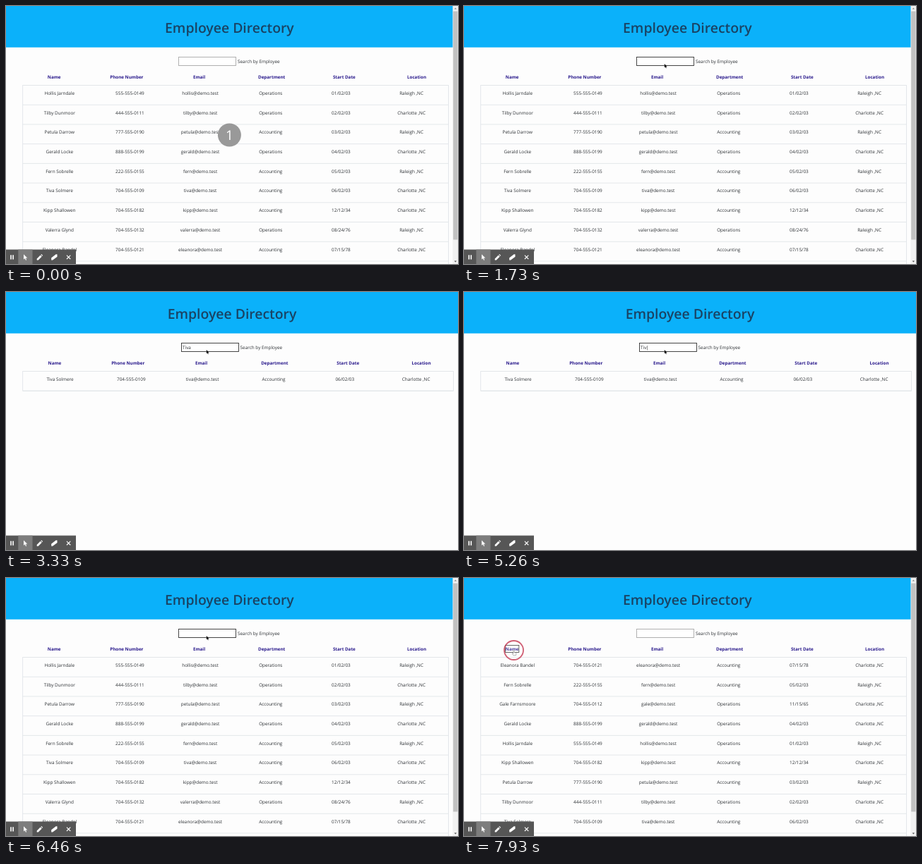
Write an HTML page that moves like this. It is 640 by 366 pixels and loops after 8000 ms.

```html
<!DOCTYPE html>
<html lang="en">
<head>
<meta charset="utf-8">
<title>Employee Directory</title>
<style>
html, body { margin: 0; width: 100%; height: 100%; overflow: hidden; background: #fdfdfd; }
svg { display: block; width: 640px; height: 366px; }
text { font: 6.4px "Open Sans", "Noto Sans", sans-serif; fill: #2b2f33; text-rendering: geometricPrecision; }
.mid text, text.mid { text-anchor: middle; }
.title { font-size: 19.4px; font-weight: 600; fill: #1a4364; }
.head text { font-size: 6.25px; font-weight: 700; fill: #2a1a8c; }
.count { font-size: 19px; fill: #fff; }
.line { fill: none; stroke: #dee2e6; stroke-width: .8; }
</style>
</head>
<body>
<svg viewBox="0 0 640 366">
  <rect width="640" height="366" fill="#fdfdfd"/>
  <g id="page"></g>
  <g id="scrollbar">
    <rect x="632.5" width="7.5" height="366" fill="#f1f1f1"/>
    <rect x="633.2" y="7.5" width="6.2" height="324" fill="#c1c1c1"/>
    <path d="M634.6 4.6 636.4 2.6 638.2 4.6Z" fill="#8a8a8a"/>
    <path d="M634.6 361.4 636.4 363.4 638.2 361.4Z" fill="#505050"/>
  </g>
  <g id="toolbar">
    <rect y="345.5" width="99" height="20.5" fill="#565656"/>
    <rect x="17.3" y="345.5" width="20.2" height="20.5" fill="#7d7d7d"/>
    <g fill="#fff">
      <path d="M6.2 353.2h1.6v6.4h-1.6zM9.3 353.2h1.6v6.4h-1.6z"/>
      <path d="M25 352.2v7.4l1.8-1.6 1.2 2.7 1.1-.5-1.2-2.6 2.4-.2z"/>
      <path d="M43.7 360.4v-2l5-5 2 2-5 5zM49.3 352.8l.9-.8 2 2-.9.8z"/>
      <path d="M64.2 357.2 70.6 352.2h1.9v3.6L66 360.6h-1.8z"/>
    </g>
    <path d="M85.9 353.6 91.3 359M91.3 353.6 85.9 359" stroke="#fff" stroke-width="1.1"/>
  </g>
  <g id="pointer">
    <path id="arrow" d="M0 0v5.3l1.2-1.1.9 2 .9-.4-.9-1.9h1.7z" fill="#000" stroke="#fff" stroke-width=".4" paint-order="stroke"/>
    <path id="hand" d="M-.6 .6a.6 .6 0 0 1 1.2 0V3l2.3.5q.7.2.6 1L3 7.3H-.6L-2.6 4.6q.5-.8 1.2-.2l.8.6z" fill="#fff" stroke="#555" stroke-width=".5"/>
  </g>
  <circle id="ring" fill="#fff" fill-opacity=".2" stroke="#c63a54" stroke-width="1.8"/>
  <g id="countdown">
    <circle cx="316.4" cy="183" r="16.5" fill="#999"/>
    <text class="count mid" x="316.4" y="189.8">1</text>
  </g>
</svg>
<script>
const LOOP = 8000, BLINK = 530, FOCUS = 1000, SORT = 7660;
const HEADS = ['Name', 'Phone Number', 'Email', 'Department', 'Start Date', 'Location'];
const STAFF = `Hollis Jarndale|555-555-0149|hollis|O|01/02/03|R
Tilby Dunmoor|444-555-0111|tilby|O|02/02/03|C
Petula Darrow|777-555-0190|petula|A|03/02/03|R
Gerald Locke|888-555-0199|gerald|O|04/02/03|C
Fern Sobrelle|222-555-0155|fern|A|05/02/03|R
Tiva Solmere|704-555-0109|tiva|A|06/02/03|C
Kipp Shallowen|704-555-0182|kipp|A|12/12/34|C
Valerra Glynd|704-555-0132|valerra|O|08/24/76|R
Eleanora Bandel|704-555-0121|eleanora|A|07/15/78|C
Gale Farnsmoore|704-555-0112|gale|O|11/15/65|C`.split('\n').map(line => {
  const [name, phone, user, dept, date, city] = line.split('|');
  return [name, phone, user + '@demo.test', dept === 'O' ? 'Operations' : 'Accounting',
    date, (city === 'R' ? 'Raleigh' : 'Charlotte') + ' ,NC'];
});
const SORTED = [...STAFF].sort((a, b) => a[0] < b[0] ? -1 : 1);

const TYPED = [[0, ''], [1860, 'T'], [2060, 'Ti'], [2400, 'Tiv'], [2660, 'Tiva'],
  [5200, 'Tiv'], [5500, 'Ti'], [5730, 'T'], [5870, '']];
const PATH = [[0, 308, 180], [200, 308, 180], [330, 292, 100], [530, 290, 97], [660, 283.8, 82],
  [6800, 283.8, 82], [7150, 170, 97], [7450, 76, 106], [7600, 70.5, 102.5]];
const CLICKS = [950, 7610];

const $ = id => document.getElementById(id);
const last = (list, t) => list.findLast(step => step[0] <= t);
const show = (el, on) => el.setAttribute('visibility', on ? 'visible' : 'hidden');
const text = (x, y, s, cls = '') => `<text x="${x}" y="${y}" class="${cls}">${s}</text>`;
const box = (x, y, w, h, attrs) => `<rect x="${x}" y="${y}" width="${w}" height="${h}" ${attrs}/>`;

function drawPage(query, sorted, focus, caret) {
  const full = !query;
  const width = full ? 633 : 640;
  const rows = (sorted ? SORTED : STAFF).filter(row => row[0].startsWith(query)).slice(0, 9);
  const mid = full ? 316.4 : 320;
  const left = full ? 244.5 : 248.5;
  const right = full ? 626.5 : 633.5;
  const [head0, headStep, cell0, cellStep] = full ? [68.2, 102.66, 75.8, 99.65] : [68.9, 103.82, 76.5, 100.82];
  const lineY = i => 112.5 + 27.72 * i;

  let out = box(0, 0, width, 58.7, 'fill="#0bb1fa"') + text(mid, 37.6, 'Employee Directory', 'title mid');
  out += box(left, 72.5, 81, 12, `fill="#fff" stroke="${focus ? '#333' : '#a8a8a8'}" stroke-width=".9"`);
  out += `<text x="${left + 1.5}" y="81.4">${query}<tspan fill="#000" dx="-.6" fill-opacity="${caret ? 1 : 0}">|</tspan></text>`;
  out += text(mid + 11.6, 81.4, 'Search by Employee');
  out += '<g class="mid head">' + HEADS.map((s, c) => text(head0 + headStep * c, 103, s)).join('') + '</g>';
  if (sorted) out += box(58.5, 95.5, 19.3, 10, 'fill="none" stroke="#222" stroke-width=".8"');

  const bottom = full ? 370 : lineY(rows.length);
  out += box(23.7, 112.5, right - 23.7, bottom - 112.5, 'class="line"');
  out += '<g class="mid">';
  rows.forEach((row, r) => {
    out += `<path class="line" d="M23.7 ${lineY(r + 1)}H${right}"/>`;
    row.forEach((s, c) => out += text(cell0 + cellStep * c, 125.8 + 27.72 * r, s));
  });
  $('page').innerHTML = out + '</g>';
  show($('scrollbar'), full);
}

function pointerAt(t) {
  const i = PATH.findLastIndex(p => p[0] <= t);
  const [t0, x0, y0] = PATH[i];
  const [t1, x1, y1] = PATH[i + 1] || [LOOP, x0, y0];
  const k = (t - t0) / (t1 - t0), e = k * k * (3 - 2 * k);
  return [x0 + (x1 - x0) * e, y0 + (y1 - y0) * e];
}

let drawn = '';
function render(t) {
  const [keyTime, query] = last(TYPED, t);
  const sorted = t >= SORT;
  const focus = t >= FOCUS && t < CLICKS[1];
  const caret = focus && Math.floor((t - Math.max(keyTime, FOCUS)) / BLINK) % 2 === 0;
  const key = [query, sorted, focus, caret].join();
  if (key !== drawn) drawPage(query, sorted, focus, caret);
  drawn = key;

  const [x, y] = pointerAt(t);
  $('pointer').setAttribute('transform', `translate(${x} ${y})`);
  const hand = t >= 7430;
  show($('arrow'), !hand && t >= 60);
  show($('hand'), hand);
  show($('countdown'), t < 60);

  const age = t - (CLICKS.findLast(c => c <= t) ?? -LOOP);
  const ring = $('ring');
  show(ring, age < 450);
  ring.setAttribute('cx', x);
  ring.setAttribute('cy', y);
  ring.setAttribute('r', 4 + 9.5 * Math.min(1, age / 260));
  ring.setAttribute('opacity', age < 260 ? .9 : Math.max(0, .9 - (age - 260) / 700));
}

const start = performance.now();
(function tick() {
  render((performance.now() - start) % LOOP);
  requestAnimationFrame(tick);
})();
</script>
</body>
</html>
```
